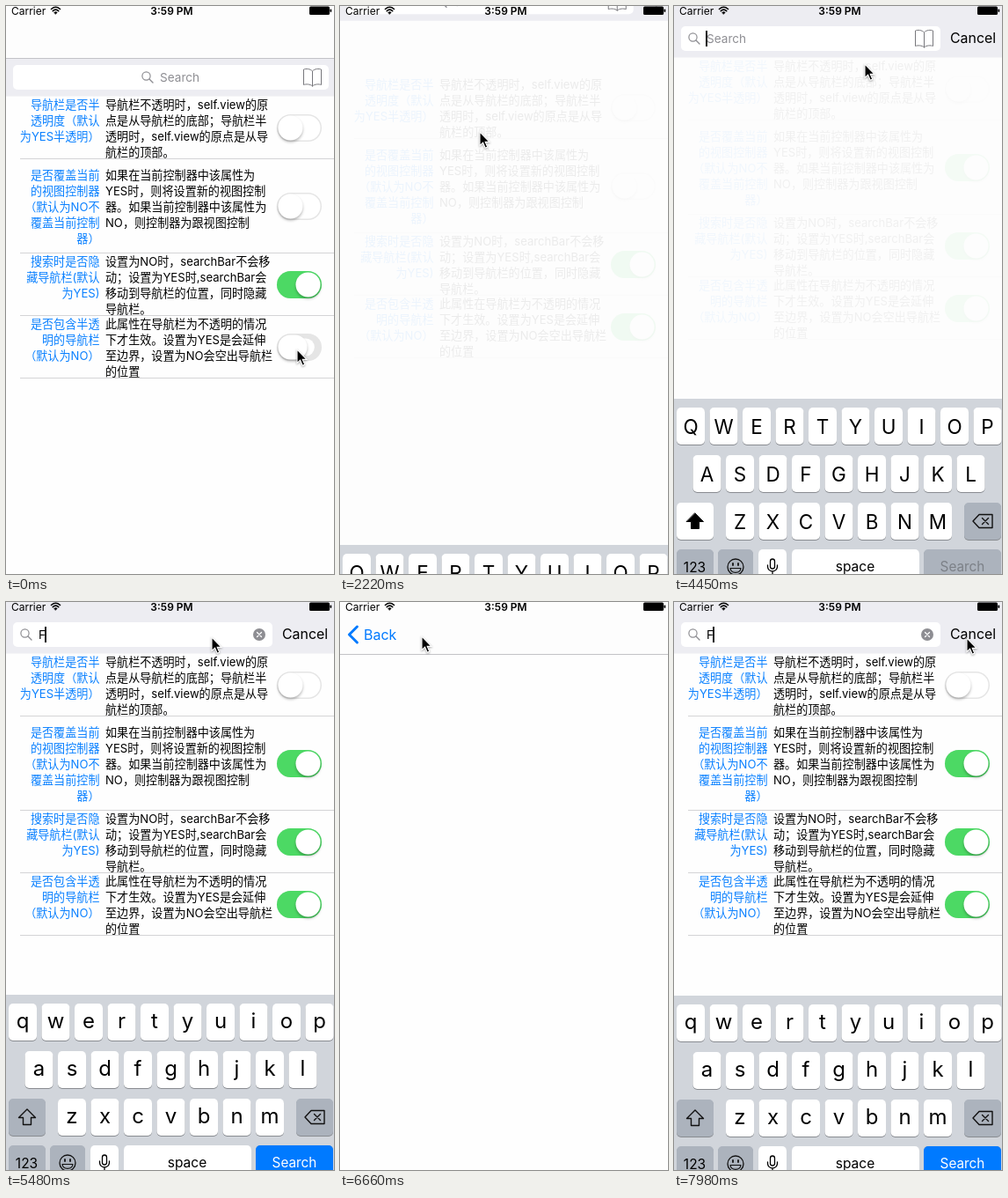
These frames come from a looping animation (373 by 645 pixels, 8000 ms). An HTML page:

```html
<!DOCTYPE html>
<html lang="zh">
<head>
<meta charset="utf-8">
<style>
  html, body { margin: 0; width: 100%; height: 100%; overflow: hidden; background: #fefefe; }
  svg { display: block; width: 100vw; height: 100vh; }
  text { font-family: Inter, "Noto Sans CJK SC", "Noto Sans CJK", sans-serif; white-space: pre; }
  .cell { font-size: 13.1px; }
  .title { fill: #0a80ff; text-anchor: end; }
  .mid { text-anchor: middle; }
  .line { fill: none; stroke-linecap: round; stroke-linejoin: round; }
  .knob { fill: #fff; filter: drop-shadow(0 2px 1.5px rgba(0, 0, 0, .28)); }
</style>
</head>
<body>
<svg id="stage" viewBox="0 0 373 645" preserveAspectRatio="none"></svg>
<script>
const LOOP = 8000, TICK = 147.8;
const BLUE = '#007aff', GREY = '#8e8e93', PAGE = '#fefefe';

const rows = [
  { y: 117, end: 173.5, mid: 138.5,
    title: ['导航栏是否半', '透明度（默认', '为YES半透明）'],
    body: ['导航栏不透明时，self.view的原', '点是从导航栏的底部；导航栏半', '透明时，self.view的原点是从导', '航栏的顶部。'] },
  { y: 197, end: 280.5, mid: 227.5,
    title: ['是否覆盖当前', '的视图控制器', '（默认为NO不', '覆盖当前控制', '器）'],
    body: ['如果在当前控制器中该属性为', 'YES时，则将设置新的视图控制', '器。如果当前控制器中该属性为', 'NO，则控制器为跟视图控制'] },
  { y: 295, end: 351.5, mid: 316.5,
    title: ['搜索时是否隐', '藏导航栏(默认', '为YES)'],
    body: ['设置为NO时，searchBar不会移', '动；设置为YES时,searchBar会', '移动到导航栏的位置，同时隐藏', '导航栏。'] },
  { y: 366, end: 422.5, mid: 387.5,
    title: ['是否包含半透', '明的导航栏', '（默认为NO）'],
    body: ['此属性在导航栏为不透明的情况', '下才生效。设置为YES是会延伸', '至边界，设置为NO会空出导航栏', '的位置'] }
];

const rect = (x, y, w, h, fill, r = 0, more = '') =>
  `<rect x="${x}" y="${y}" width="${w}" height="${h}" rx="${r}" fill="${fill}" ${more}/>`;
const text = (x, y, s, size, fill = '#000', more = '') =>
  `<text x="${x}" y="${y}" font-size="${size}" fill="${fill}" ${more}>${s}</text>`;
const path = (d, stroke, width = 1, fill = 'none') =>
  `<path class="line" d="${d}" style="fill:${fill}" stroke="${stroke}" stroke-width="${width}"/>`;
const group = (id, inner) => `<g id="${id}">${inner}</g>`;

const cellLines = (lines, x, y, kind) => lines.map((s, i) =>
  `<text class="cell ${kind}" x="${x}" y="${y + 18 * i}">${s}</text>`).join('');

const toggle = (y, i) => group('switch' + i,
  `<g transform="translate(333.5 ${y})">` +
  rect(-25.5, -15.5, 51, 31, '#e5e5e5', 15.5) +
  rect(-24, -14, 48, 28, '#fff', 14, 'class="hole"') +
  rect(-25.5, -15.5, 51, 31, '#4cd964', 15.5, 'class="on"') +
  rect(-24, -14, 28, 28, '#fff', 14, 'class="knob"') + '</g>');

const list = rows.map((r, i) =>
  cellLines(r.title, 106.5, r.y, 'title') + cellLines(r.body, 113, r.y, '') +
  rect(16, r.end - .5, 357, 1, '#d4d4d6') + toggle(r.mid, i)).join('');

const searchBar =
  rect(0, -120, 373, 222.5, '#ededf2') +
  rect(8, 67, 359, 28, '#fff', 5, 'id="field"') +
  group('hint',
    `<circle cx="159.5" cy="79.5" r="4.6" fill="none" stroke="${GREY}" stroke-width="1.2"/>` +
    path('M163 83 L167 87', GREY, 1.4) +
    text(175, 86, 'Search', 13.6, GREY, 'id="placeholder"')) +
  group('book', path('M348.5 74C346 71 341 71 338.5 72V89.5C341 88.5 346 88.5 348.5 91' +
    'C351 88.5 356 88.5 358.5 89.5V72C356 71 351 71 348.5 74V91', '#77777c')) +
  group('typed', text(37, 86, 'F', 13.6) +
    `<circle cx="288" cy="81" r="7" fill="${GREY}"/>` +
    path('M285.5 78.5l5 5m0-5l-5 5', '#fff', 1.2)) +
  rect(44, 72, 2, 18, '#111', 0, 'id="caret"') +
  text(314, 86, 'Cancel', 15.9, '#000', 'id="cancel"');

const key = (x, y, w, fill = '#fff') =>
  rect(x, y + 1, w, 42, '#898c91', 5) + rect(x, y, w, 42, fill, 5);
const DARK = '#acb3bd';
const letterRows = [['QWERTYUIOP', 3, 10], ['ASDFGHJKL', 21.5, 64], ['ZXCVBNM', 59, 118]];
const eachKey = draw => letterRows.map(([s, x, y]) =>
  [...s].map((c, i) => draw(c, x + 37.5 * i, y)).join('')).join('');
const ARROW = 'M24 130L33.5 139.5H28.5V147.5H19.5V139.5H14.5Z';

const keyboard =
  rect(0, 0, 373, 230, '#d1d5db') +
  eachKey((c, x, y) => key(x, y, 32)) +
  group('upper', key(3, 118, 42) + path(ARROW, '#000', 1, '#000') +
    eachKey((c, x, y) => text(x + 16, y + 29.5, c, 22.5, '#000', 'class="mid"'))) +
  group('lower', key(3, 118, 42, DARK) + path(ARROW, '#111', 1.4) +
    eachKey((c, x, y) => text(x + 16, y + 27.5, c.toLowerCase(), 24, '#000', 'class="mid"'))) +
  key(330, 118, 42, DARK) +
  path('M340 139L347 131.5H362V146.5H347Z', '#111', 1.4) +
  path('M350.5 135.5l7 7m0-7l-7 7', '#111', 1.4) +
  key(3, 171, 42, DARK) + text(23.5, 197, '123', 15.5, '#000', 'class="mid"') +
  key(50, 171, 40, DARK) +
  '<circle cx="70" cy="191" r="9" fill="none" stroke="#111" stroke-width="1.3"/>' +
  path('M64 192.5H76C75 199 65 199 64 192.5Z', '#111', 1.2) +
  path('M67 187v2M73 187v2', '#111', 1.8) +
  key(96, 171, 32) + rect(109.5, 182, 5, 11, '#fff', 2.5, 'stroke="#000" stroke-width="1.3"') +
  path('M106.5 189v1.5a5.5 5.5 0 0 0 11 0V189M112 196v4M109 200h6', '#000', 1.3) +
  key(134, 171, 145) + text(206, 196, 'space', 15.5, '#000', 'class="mid"') +
  key(284, 171, 88, DARK) + text(328, 196, 'Search', 15.3, '#7c8087', 'class="mid"') +
  group('go', rect(284, 171, 88, 42, BLUE, 5) + text(328, 196, 'Search', 15.3, '#fff', 'class="mid"'));

const status =
  text(6, 10, 'Carrier', 12) + text(188.5, 10, '3:59 PM', 12, '#000', 'class="mid" font-weight="600"') +
  path('M51.5 3.5Q56.5 -1 61.5 3.5M53.3 5.6Q56.5 2.6 59.7 5.6', '#000', 1.6) +
  path('M54.8 7.3Q56.5 5.8 58.2 7.3L56.5 9.2Z', '#000', .6, '#000') +
  rect(345, .5, 23, 9.5, '#000', 1.5) + rect(368.5, 3.5, 1.7, 3.5, '#000', .8);

const navBar = rect(0, -80, 373, 139, '#fdfdfd') + rect(0, 59, 373, 1, '#c3c3c7');

document.getElementById('stage').innerHTML =
  rect(0, 0, 373, 645, PAGE) +
  group('home', group('list', list) + rect(0, 0, 373, 645, '#fdfdfd', 0, 'id="dim"') +
    group('bar', searchBar) + group('nav', navBar)) +
  group('keyboard', keyboard) +
  group('detail', rect(0, 0, 373, 645, PAGE) + navBar +
    path('M19.5 28L10.5 37L19.5 46', BLUE, 3) + text(27, 43, 'Back', 16, BLUE)) +
  group('status', status) +
  group('pointer', '<path d="M0 0V15.5L3.6 12.2L6.2 18.2L8.7 17.1L6.2 11.4H11Z" ' +
    'stroke="#fff" stroke-width="1.1" style="filter:drop-shadow(0 1px 1px rgba(0,0,0,.35))"/>');

// Tracks are lists of [tick, value, ...], linear between entries.
const tracks = {
  active: [[8, 0], [9, .6], [10, 1], [14, 1], [15, .52], [16, .06], [17, 0], [25, 0], [26, .22], [27, .93], [28, 1]],
  hint: [[8, 0], [9, -110], [10, -138], [14, -138], [15, -46], [16, 0], [25, 0], [26, -56], [27, -130], [28, -138]],
  dim: [[8, 0], [9, .9], [10, .95], [14, .95], [15, .93], [16, .4], [17, 0], [25, 0], [26, .92], [27, .95], [34, .95], [35, 0]],
  keys: [[7, 663], [8, 490], [9, 448], [10, 446], [14, 446], [15, 612], [16, 663], [25, 663], [26, 526], [27, 450], [28, 446], [53, 446], [54, 447]],
  push: [[40, 0], [41, .45], [42, .87], [43, 1], [46, 1], [47, .85], [48, .38], [49, .08], [50, 0]],
  second: [[18, 0], [19, .3], [20, 1]],
  fourth: [[0, 0], [1, .6], [2, 1]],
  pointer: [[0, 331, 390], [1, 331, 390], [2, 318, 362], [5, 182, 105], [6, 170, 87], [10, 170, 87], [13, 159, 143],
    [15, 159, 143], [17, 358, 241], [18, 358, 241], [19, 332, 218], [21, 332, 218], [22, 200, 92], [28, 200, 92],
    [32, 234, 40], [38, 234, 40], [40, 200, 110], [43, 200, 110], [45, 93, 39], [46, 48, 36], [49, 48, 36],
    [52, 310, 46], [53, 333, 41]]
};

function at(name, tick, column = 1) {
  const track = tracks[name];
  const next = track.findIndex(p => p[0] >= tick);
  if (next < 0) return track[track.length - 1][column];
  if (next === 0) return track[0][column];
  const a = track[next - 1], b = track[next];
  return a[column] + (b[column] - a[column]) * (tick - a[0]) / (b[0] - a[0]);
}

const el = id => document.getElementById(id);
const move = (id, x, y) => el(id).setAttribute('transform', `translate(${x} ${y})`);
const show = (id, visible) => el(id).setAttribute('opacity', +visible);

function setSwitch(i, value, pressed = false) {
  const part = name => el('switch' + i).querySelector('.' + name);
  const width = pressed ? 33 : 28;
  part('on').setAttribute('opacity', value);
  part('hole').setAttribute('transform', `scale(${pressed ? .72 : 1 - value})`);
  part('knob').setAttribute('width', width);
  part('knob').setAttribute('x', -24 + (48 - width) * value);
}

function render(tick) {
  const active = at('active', tick), push = at('push', tick);
  const coversNav = tick > 20, typed = tick >= 35;

  move('home', -112 * push, 0);
  move('list', 0, -44 * active);
  move('bar', 0, -(coversNav ? 44 : 165) * active);
  move('nav', 0, -(coversNav ? 64 : 140) * active);
  show('dim', 1);
  el('dim').setAttribute('opacity', at('dim', tick));

  el('field').setAttribute('width', 359 - 64 * active);
  move('hint', at('hint', tick), 0);
  move('book', -64 * active, 0);
  move('cancel', 64 * (1 - active), 0);
  show('placeholder', !typed);
  show('book', !typed);
  show('typed', typed);
  move('caret', typed ? 0 : -8, 0);
  show('caret', typed || (tick >= 28 && tick % 7 < 4));

  move('keyboard', -373 * push, at('keys', tick));
  show('upper', !typed);
  show('lower', typed);
  show('go', typed);
  move('detail', 373 * (1 - push), 0);
  move('pointer', at('pointer', tick), at('pointer', tick, 2));

  setSwitch(0, 0);
  setSwitch(1, at('second', tick), tick === 19);
  setSwitch(2, 1);
  setSwitch(3, at('fourth', tick), tick === 0);
}

const start = performance.now();
function frame() {
  const time = (performance.now() - start) % LOOP;
  render(Math.floor(time / TICK + .05));
  requestAnimationFrame(frame);
}
frame();
</script>
</body>
</html>
```
